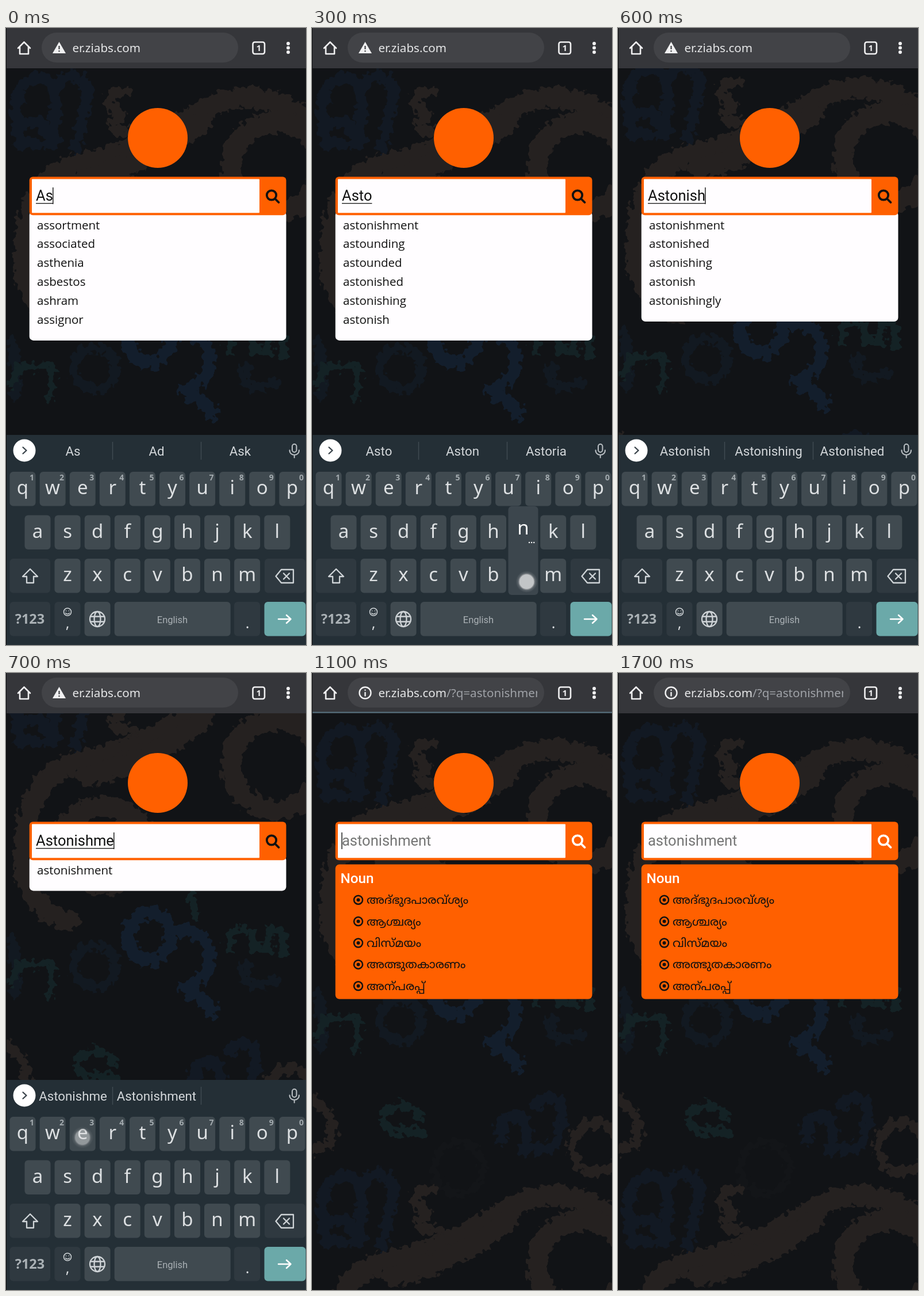
Recreate the animation shown at these times as an HTML page. Size 522x1072 px, loop 1800 ms.

```html
<!DOCTYPE html>
<html lang="en">
<head>
<meta charset="utf-8">
<title>Dictionary search</title>
<style>
html, body { margin: 0; width: 100%; height: 100%; overflow: hidden; background: #111316; }
svg { display: block; width: 100%; height: 100%; }
text { font-family: "Noto Sans", sans-serif; white-space: pre; }
.page { font-family: "Open Sans", sans-serif; font-size: 20.5px; }
.field { font-family: Roboto, sans-serif; font-size: 25.5px; }
.noun { font: 500 24.3px Roboto, sans-serif; }
.meaning { font: 20.6px "Noto Sans Malayalam", "Noto Sans", sans-serif; }
.hint { font: 22.3px Roboto, sans-serif; fill: #d3d7da; text-anchor: middle; }
.key { font-size: 33px; fill: #dde0e2; text-anchor: middle; }
.digit { font-size: 14px; font-weight: 600; fill: #a3abaf; text-anchor: middle; }
.line { fill: none; stroke-linecap: round; stroke-linejoin: round; }
</style>
</head>
<body>
<svg viewBox="0 0 522 1072">
  <defs>
    <filter id="rough" filterUnits="userSpaceOnUse" x="-20" y="-20" width="562" height="960" color-interpolation-filters="sRGB">
      <feTurbulence type="fractalNoise" baseFrequency=".09" numOctaves="2" seed="4"/>
      <feDisplacementMap in="SourceGraphic" scale="26" xChannelSelector="R" yChannelSelector="G"/>
    </filter>
    <radialGradient id="glow">
      <stop offset=".6" stop-color="#fff" stop-opacity=".35"/>
      <stop offset="1" stop-color="#fff" stop-opacity="0"/>
    </radialGradient>
    <clipPath id="address"><path d="M110 8H392V60H110z"/></clipPath>
    <g id="tile" class="line" filter="url(#rough)">
      <g stroke="#252120" stroke-width="36">
        <path d="M110 512Q40 500 30 410Q30 260 130 235Q230 215 340 145Q430 90 525 160"/>
        <path d="M140 262Q250 235 340 165"/>
        <ellipse cx="170" cy="382" rx="75" ry="68"/>
        <circle cx="470" cy="242" r="78"/>
      </g>
      <g stroke="#252120" stroke-width="18">
        <path d="M208 112Q170 115 182 138Q215 145 185 162Q180 182 222 180M0 728Q50 760 30 805L0 818"/>
        <circle cx="495" cy="813" r="42"/>
      </g>
      <g stroke="#121923" stroke-width="20">
        <path d="M25 205Q0 90 60 85Q90 90 85 150V200M85 110Q110 60 140 100Q140 150 120 210M30 170q25-20 40 10t-30 20"/>
        <path d="M330 800Q320 750 360 760Q380 780 370 820M390 740Q430 700 435 760Q430 820 390 815"/>
      </g>
      <g stroke="#131e2c" stroke-width="23">
        <ellipse cx="250" cy="540" rx="36" ry="42"/>
        <path d="M295 530Q350 525 355 580Q345 620 310 630Q340 645 360 670"/>
      </g>
      <g stroke="#121921" stroke-width="17">
        <circle cx="155" cy="592" r="36"/>
        <path d="M8 540Q25 590 15 640M420 590Q400 640 470 615"/>
      </g>
      <ellipse cx="255" cy="848" rx="42" ry="45" stroke="#131518" stroke-width="14"/>
      <path stroke="#142225" stroke-width="15" d="M390 560Q385 522 415 530M430 530V562H458V528Q490 522 482 572M10 620Q20 575 50 592Q90 570 75 640M322 465L330 505M188 760Q170 728 130 747Q112 780 150 782L192 788"/>
    </g>
  </defs>

  <rect width="522" height="1072" fill="#111316"/>
  <g id="backdrop">
    <use href="#tile"/><use href="#tile" y="775"/>
  </g>

  <rect width="522" height="70" fill="#35363a"/>
  <rect x="62" y="8" width="342" height="52" rx="26" fill="#424347"/>
  <g class="line" stroke="#f0f0f1" stroke-width="2.6">
    <path d="M21 35L31.500 24.500L42 35M24 33V45H39V33"/>
    <rect x="429.500" y="24.500" width="20.500" height="20.500" rx="3.500"/>
  </g>
  <text x="439.700" y="40" font-size="15" font-weight="700" fill="#f0f0f1" text-anchor="middle">1</text>
  <path class="line" d="M491 27v0M491 34.500v0M491 42v0" stroke="#f0f0f1" stroke-width="6"/>

  <circle cx="264" cy="191" r="52" fill="#ff6000"/>
  <g id="page"></g>

  <g id="keyboard">
    <rect y="707" width="522" height="365" fill="#242f36"/>
    <circle cx="32" cy="734" r="19.500" fill="#fff"/>
    <path class="line" d="M29.500 728.500l6 5.500l-6 5.500" stroke="#39434a" stroke-width="2.300"/>
    <path d="M185.500 719V750M339.500 719V750" stroke="#3f4a51" stroke-width="1.500"/>
    <g class="line" stroke="#b9bfc3" stroke-width="2">
      <rect x="498" y="723" width="7.500" height="14" rx="3.700"/>
      <path d="M493.500 733.500c0 11 16.500 11 16.500 0M501.700 742v4.500"/>
    </g>
    <g id="keys"></g>
    <g class="line" stroke="#cfd4d7" stroke-width="2.300">
      <path d="M42 940L55 953H48V964H36V953H29z"/>
      <path d="M479 941H500V964H479L469.500 952.500zM483 947.500l10 10M493 947.500l-10 10"/>
      <circle cx="159" cy="1027" r="13"/>
      <ellipse cx="159" cy="1027" rx="5.500" ry="13"/>
      <path d="M147 1022.500H171M147 1031.500H171"/>
    </g>
    <g class="line" stroke="#cfd4d7" stroke-width="1.500">
      <circle cx="107" cy="1014.500" r="6.500"/>
      <path d="M104.500 1012.500v.2M109.500 1012.500v.2M103.500 1016.500q3.500 3.500 7 0"/>
    </g>
    <path class="line" d="M474 1027H495M488 1020L495.500 1027L488 1034" stroke="#fff" stroke-width="2.500"/>
  </g>
  <g id="overlay"></g>
  <rect width="1" height="1072" fill="#090a0b"/>
</svg>

<script>
const LOOP = 1800, ORANGE = '#ff6000', PITCH = 52.1;
const byId = id => document.getElementById(id);
const box = (x, y, w, h, r, fill) =>
  `<rect x="${x}" y="${y}" width="${w}" height="${h}" rx="${r}" fill="${fill}"/>`;
const label = (x, y, cls, str, attrs = '') => `<text x="${x}" y="${y}" class="${cls}" ${attrs}>${str}</text>`;

// Keyboard layout
const rows = [['qwertyuiop', 6.5, 771], ['asdfghjkl', 32.5, 846.5], ['zxcvbnm', 84.5, 922]];
const keyAt = {};
let keys = '';
for (const [letters, left, y] of rows)
  [...letters].forEach((letter, i) => {
    const x = left + i * PITCH;
    keyAt[letter] = { x, y };
    keys += box(x, y, 45, 59.5, 6, '#404a50') + label(x + 22.5, y + 39.2, 'key', letter);
    if (y === 771) keys += label(x + 38.5, 786, 'digit', (i + 1) % 10);
  });
for (const [x, y, w, fill] of [
  [6.5, 922, 70.5, '#2f3940'], [450, 922, 71, '#2f3940'], [6.5, 997, 70.5, '#2f3940'],
  [84.5, 997, 45, '#2f3940'], [136.6, 997, 45, '#404a50'], [188.7, 997, 202, '#404a50'],
  [397, 997, 45, '#2f3940'], [449.5, 997, 72, '#6ba9a9']
]) keys += box(x, y, w, 59.5, 6, fill);
keys += label(41.5, 1035, 'key', '?123', 'style="font-size:23.5px;font-weight:600;fill:#aab1b5"')
  + label(107, 1043, 'key', ',', 'style="font-size:25px"')
  + label(420, 1043, 'key', '.', 'style="font-size:25px"')
  + label(289.5, 1033.5, 'hint', 'English', 'style="font-size:16.5px;fill:#aab1b5"');
byId('keys').innerHTML = keys;

const start = ['assortment', 'associated', 'asthenia', 'asbestos', 'ashram', 'assignor'];
const asto = ['astonishment', 'astounding', 'astounded', 'astonished', 'astonishing', 'astonish'];
const astonish = ['astonishment', 'astonished', 'astonishing', 'astonish', 'astonishingly'];
const last = { typed: 'Astonishme', words: ['astonishment'], hints: ['Astonishme', 'Astonishment'], caret: true };
const meanings = ['അദ്ഭുദപാരവ്ശ്യം', 'ആശ്ചര്യം', 'വിസ്മയം', 'അത്ഭുതകാരണം', 'അന്പരപ്പ്'];

// Each step holds until the next one begins; touch is [x, y, opacity].
const steps = [
  { at: 0, typed: 'As', words: start, hints: ['As', 'Ad', 'Ask'], caret: true },
  { at: 100, typed: 'As', words: start, hints: ['As', 'Ad', 'Ask'], press: 't' },
  { at: 200, typed: 'Ast', words: asto, hints: ['Ast', 'Astro', 'Asthma'], press: 'o' },
  { at: 300, typed: 'Asto', words: asto, hints: ['Asto', 'Aston', 'Astoria'], press: 'n' },
  { at: 400, typed: 'Aston', words: astonish, hints: ['Aston', 'Astonished', 'Astonishing'], press: 'i' },
  { at: 500, typed: 'Astonis', words: astonish, hints: ['Astonis', 'Astonish', 'Astonished'], press: 'h' },
  { at: 600, typed: 'Astonish', words: astonish, hints: ['Astonish', 'Astonishing', 'Astonished'], caret: true },
  { at: 700, ...last, touch: [133, 807, .5] },
  { at: 800, ...last },
  { at: 900, ...last, touch: [131, 341, .6] },
  { at: 1000, ...last, touch: [131, 341, .45] },
  { at: 1100, result: true, caret: true, loading: true },
  { at: 1200, result: true, caret: true },
  { at: 1500, result: true }
];

function addressBar(result) {
  const icon = result
    ? `<g class="line" stroke="#f0f0f1" stroke-width="2.4"><circle cx="92.500" cy="34.500" r="10"/>
       <path d="M92.500 34V39.500M92.500 29.700v.1"/></g>`
    : `<path d="M92.500 24L104 44H81z" fill="#f0f0f1"/>
       <path d="M92.500 31V37M92.500 39V41.300" stroke="#424347" stroke-width="2.200"/>`;
  const path = result ? '<tspan fill="#9fa2a7">/?q=astonishment</tspan>' : '';
  return icon + `<g clip-path="url(#address)">${label(115.5, 41.7, '', 'er.ziabs.com' + path, 'font-size="20.6" fill="#e6e7e8"')}</g>`;
}

function searchBox(step) {
  const ink = step.result ? '#fff' : '#111';
  return box(40.7, 258.6, 446.8, 66.6, 6, ORANGE) + box(45, 262.5, 396, 58.7, 1, '#fffdff')
    + `<g class="line" stroke="${ink}" stroke-width="3.8"><circle cx="462" cy="290.500" r="8.200"/><path d="M468.500 297L474.500 303"/></g>`
    + label(52, 300, 'field', step.typed || 'astonishment', `id="entry" fill="${step.result ? '#757575' : '#111'}"`);
}

function wordList(words) {
  return box(40.7, 318, 446.8, words.length * 32.9 + 27.5, 7, '#fffdff')
    + words.map((word, i) => label(54, 349.5 + i * 32.85, 'page', word, 'fill="#111"')).join('');
}

function resultCard() {
  return box(40.7, 332.6, 446.8, 234, 7, ORANGE) + label(49.5, 364.5, 'noun', 'Noun', 'fill="#fff"')
    + meanings.map((word, i) => {
      const y = 394.2 + i * 37.4;
      return `<circle cx="80.500" cy="${y}" r="7.500" fill="none" stroke="#111" stroke-width="2.500"/>
        <circle cx="80.500" cy="${y}" r="3" fill="#111"/>` + label(95, y + 7, 'meaning', word, 'fill="#111"');
    }).join('');
}

function touchDot([x, y, opacity]) {
  return `<g opacity="${opacity}"><circle cx="${x}" cy="${y}" r="19" fill="url(#glow)"/>
    <circle cx="${x}" cy="${y}" r="13.500" fill="#e4e5e6" stroke="#9a9da0" stroke-width="1.500"/></g>`;
}

function popup(letter) {
  const { x, y } = keyAt[letter];
  return box(x - 3.5, y - 91, 52, 154, 6, '#3c464d')
    + label(x + 22.5, y - 42, 'key', letter, 'style="fill:#fff"')
    + `<path class="line" d="M${x + 33} ${y - 28}h.1m4 0h.1m4 0h.1" stroke="#fff" stroke-width="2.300"/>`
    + touchDot([x + 28.5, y + 40, .8]);
}

function draw(step) {
  const shift = step.result ? 12 : (step.words.length - 6) * 16.45;
  byId('backdrop').setAttribute('transform', `translate(0 ${shift})`);
  byId('keyboard').style.display = step.result ? 'none' : '';
  byId('page').innerHTML = addressBar(step.result)
    + (step.loading ? box(0, 67.5, 522, 2, 0, '#56707f') : '')
    + (step.result ? resultCard() : wordList(step.words)) + searchBox(step);

  const end = step.result ? 52 : 52 + byId('entry').getComputedTextLength();
  let extra = step.result ? '' : box(52, 304, end - 52, 1.4, 0, '#222');
  if (step.caret) extra += box(end - .7, 277, 1.4, 29, 0, '#111');
  byId('page').innerHTML += extra;

  byId('overlay').innerHTML = (step.hints || []).map((hint, i) => label([116.5, 262, 407.5][i], 743, 'hint', hint)).join('')
    + (step.press ? popup(step.press) : '') + (step.touch ? touchDot(step.touch) : '');
}

let shown;
function tick() {
  const time = performance.now() % LOOP;
  const step = steps.findLast(s => s.at <= time);
  if (step !== shown) draw(shown = step);
  requestAnimationFrame(tick);
}
tick();
</script>
</body>
</html>
```
